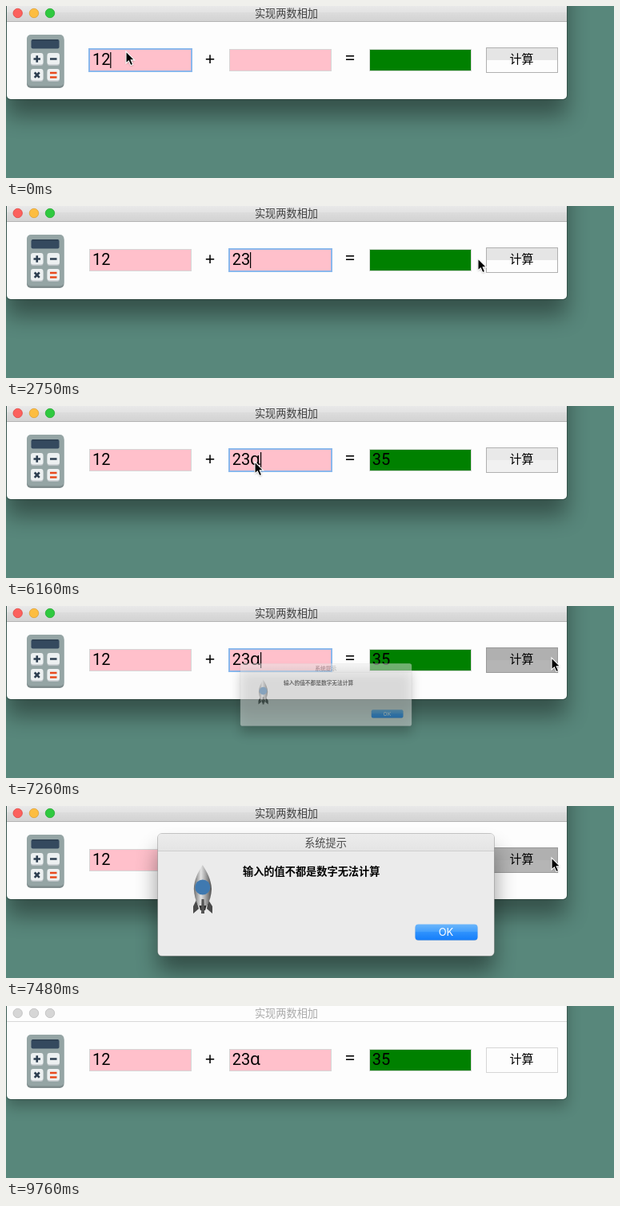
An HTML page for the animation above (9800 ms loop, 760x216 px).

```html
<!DOCTYPE html>
<html lang="zh">
<head>
<meta charset="utf-8">
<title>实现两数相加</title>
<style>
  html, body { margin: 0; width: 100%; height: 100%; overflow: hidden; background: #58877b; }
  svg { display: block; width: 760px; height: 216px; }
  text { font-family: "Noto Sans CJK SC", "Noto Sans CJK", sans-serif; font-size: 13.2px; }
  .mid { text-anchor: middle; }
  .num { font-family: Roboto, sans-serif; font-size: 20px; }
  .alpha { font-family: "Noto Sans", sans-serif; font-size: 21px; }
  .op { font-family: "Noto Sans", sans-serif; font-size: 22px; text-anchor: middle; }
  .ok { font-family: Inter, sans-serif; font-size: 13px; fill: #fff; text-anchor: middle; }
  .ring { fill: none; stroke: #8ab8ec; stroke-width: 2; }
  .sign { fill: none; stroke: #2c3e50; stroke-width: 2.6; }
</style>
</head>
<body>
<svg viewBox="0 0 760 216">
  <defs>
    <filter id="blur" x="-30%" y="-80%" width="160%" height="260%"><feGaussianBlur stdDeviation="14"/></filter>
    <filter id="soft" x="-30%" y="-80%" width="160%" height="260%"><feGaussianBlur stdDeviation="9"/></filter>
    <filter id="tiny" x="-50%" y="-50%" width="200%" height="200%"><feGaussianBlur stdDeviation="1"/></filter>
    <linearGradient id="bar" x2="0" y2="1">
      <stop offset="0" stop-color="#e9e9e9"/><stop offset=".4" stop-color="#e2e2e2"/>
      <stop offset=".42" stop-color="#dcdcdc"/><stop offset="1" stop-color="#d2d2d2"/>
    </linearGradient>
    <linearGradient id="dbar" x2="0" y2="1">
      <stop offset="0" stop-color="#ececec"/><stop offset="1" stop-color="#e4e4e4"/>
    </linearGradient>
    <linearGradient id="blue" x2="0" y2="1">
      <stop offset="0" stop-color="#6cb6fb"/><stop offset=".45" stop-color="#45a0fc"/>
      <stop offset=".5" stop-color="#2f92fd"/><stop offset="1" stop-color="#147dfa"/>
    </linearGradient>
    <linearGradient id="deep" x2="0" y2="1">
      <stop offset="0" stop-color="#4a98f8"/><stop offset="1" stop-color="#0a5fe2"/>
    </linearGradient>
    <linearGradient id="steel">
      <stop offset="0" stop-color="#6c6c6c"/><stop offset=".4" stop-color="#e2e2e2"/>
      <stop offset=".65" stop-color="#a8a8a8"/><stop offset="1" stop-color="#505050"/>
    </linearGradient>
  </defs>

  <rect width="760" height="216" fill="#58877b"/>

  <!-- main window -->
  <rect id="shade" x="1" y="-30" width="700" height="168" fill="#000" opacity=".4" filter="url(#blur)"/>
  <rect id="paleShade" x="1" y="-30" width="700" height="156" fill="#000" opacity=".28" filter="url(#soft)"/>
  <rect x=".5" y="-4.5" width="701" height="122" rx="5" fill="none" stroke="#000" stroke-opacity=".22"/>
  <rect x="1" y="-4" width="700" height="121" rx="5" fill="#fdfdfd"/>
  <g id="barOn">
    <path d="M1 0H700Q701 0 701 2V20H1Z" fill="url(#bar)"/>
    <path d="M1 19.5H701" stroke="#b4b4b4"/>
  </g>
  <path id="barOff" d="M1 19.5H701" stroke="#d9d9d9"/>
  <g id="lights" stroke-width=".8">
    <circle cx="14.7" cy="9" r="5.7" fill="#fc615d" stroke="#e0443f"/>
    <circle cx="35" cy="9" r="5.7" fill="#fdbd40" stroke="#dea034"/>
    <circle cx="55" cy="9" r="5.7" fill="#2fc93f" stroke="#25aa33"/>
  </g>
  <g id="greys" fill="#d6d6d6" stroke="#bdbdbd" stroke-width=".8">
    <circle cx="14.7" cy="9" r="5.7"/><circle cx="35" cy="9" r="5.7"/><circle cx="55" cy="9" r="5.7"/>
  </g>
  <text id="title" class="mid" x="350.5" y="14.3">实现两数相加</text>

  <!-- calculator -->
  <rect x="26" y="38" width="46.5" height="65" rx="5" fill="#7f8c8d"/>
  <rect x="26" y="36" width="46.5" height="64.500" rx="5" fill="#95a5a5"/>
  <rect x="31.500" y="42" width="35" height="11.500" rx="2" fill="#34495e"/>
  <path d="M33 42.800H65" stroke="#2c3e50" stroke-width="1.600"/>
  <g fill="#bdc3c7">
    <rect x="31" y="61" width="15.500" height="14" rx="3"/><rect x="51.500" y="61" width="15.500" height="14" rx="3"/>
    <rect x="31" y="81" width="15.500" height="14" rx="3"/><rect x="51.500" y="81" width="15.500" height="14" rx="3"/>
  </g>
  <g fill="#ecf0f1">
    <rect x="31" y="59" width="15.500" height="14.500" rx="3"/><rect x="51.500" y="59" width="15.500" height="14.500" rx="3"/>
    <rect x="31" y="79" width="15.500" height="14.500" rx="3"/><rect x="51.500" y="79" width="15.500" height="14.500" rx="3"/>
  </g>
  <path class="sign" d="M34.500 66.500H43M38.750 62.200V70.800M55 66.500H63.500M35.700 83.500L41.800 89.800M41.800 83.500L35.700 89.800"/>
  <path d="M55 84H63.500M55 89.500H63.500" stroke="#e8491d" stroke-width="2.500"/>

  <!-- fields -->
  <g stroke="#d6d6d6">
    <rect x="104.5" y="54.5" width="127" height="27" fill="#ffc0cb"/>
    <rect x="279.5" y="54.5" width="127" height="27" fill="#ffc0cb"/>
    <rect x="454.5" y="54.5" width="127" height="27" fill="#008000"/>
  </g>
  <rect id="ring1" class="ring" x="104" y="54" width="128" height="28"/>
  <rect id="ring2" class="ring" x="279" y="54" width="128" height="28"/>
  <text class="num" x="108" y="74">12</text>
  <text id="two" class="num" x="282.8" y="74">2</text>
  <text id="three" class="num" x="294" y="74">3</text>
  <text id="letter" class="alpha" x="305" y="74">ɑ</text>
  <text id="sum" class="num" x="457.800" y="74">35</text>
  <text class="op" x="255" y="73.500">+</text>
  <text class="op" x="430" y="73.300">=</text>
  <rect id="caret" y="58" width="1.200" height="20"/>

  <!-- button -->
  <rect id="face" x="600.5" y="52.5" width="89" height="31"/>
  <rect id="gloss" x="601" y="53" width="88" height="15"/>
  <text class="mid" x="644.5" y="72.300" style="font-size:15px">计算</text>

  <!-- dialog -->
  <g id="dialog">
    <rect id="dshade" x="190" y="55" width="420" height="153" rx="5" filter="url(#blur)"/>
    <g id="panel">
      <rect x="189.500" y="34.500" width="421" height="154" rx="5.500" fill="#ebebeb" stroke="#000" stroke-opacity=".2"/>
      <path d="M190 57V40Q190 35 195 35H605Q610 35 610 40V57Z" fill="url(#dbar)"/>
      <path d="M190 56.500H610" stroke="#cfcfcf"/>
      <text class="mid" x="399.500" y="51" fill="#4c4c4c">系统提示</text>
      <text x="296" y="86.500" font-weight="700">输入的值不都是数字无法计算</text>
      <g id="rocket">
        <path d="M238 118L234 126V135L241 129ZM253 118L258 126V135L251 129Z" fill="#4a4a4a"/>
        <path d="M241 124H251L249 131H243Z" fill="#333"/>
        <path d="M245.700 74C240 83 235 93 234.800 104Q235.500 116 240 125H251.500Q256.500 116 257 104C256.500 93 251.500 83 245.700 74Z" fill="url(#steel)"/>
        <path d="M244.500 117H247.500L248 135H244Z" fill="#555"/>
        <circle cx="245.800" cy="102" r="9.500" fill="#3f79b0"/>
      </g>
      <rect x="511.500" y="149" width="78" height="20" rx="4" fill="#000" opacity=".15"/>
      <rect id="okFace" x="511.500" y="148.500" width="78" height="20" rx="4"/>
      <text class="ok" x="550" y="163">OK</text>
    </g>
  </g>

  <g id="mouse">
    <path d="M0 1.500V16L3.500 13 6 18.500 8.800 17.300 6.500 12H11Z" opacity=".35" filter="url(#tiny)"/>
    <path d="M0 0V15L3.400 11.900 5.900 17.600 8.600 16.400 6.200 10.900H10.700Z" stroke="#fff" stroke-width="1.100"/>
  </g>
</svg>
<script>
const LOOP = 9800;
const el = Object.fromEntries([...document.querySelectorAll('[id]')].map(n => [n.id, n]));

// start, end, number of picture changes
const bursts = [[780, 1180, 8], [1950, 2930, 17], [4000, 4230, 5], [4460, 5320, 16],
  [6400, 6970, 10], [7200, 7480, 6], [7780, 8650, 15], [8950, 9120, 4]];

// time, x, y of the pointer
const route = [[740, 150, 57], [1180, 223, 55], [2200, 223, 55], [2750, 590, 66], [2930, 634, 66],
  [3950, 634, 66], [4230, 620, 75], [4460, 620, 75], [5020, 206, 77], [5320, 311, 70],
  [6350, 311, 70], [6920, 682, 65], [7780, 682, 65], [8400, 557, 161],
  [8900, 557, 161], [9120, 550, 217]];

// time, scale, opacity of the dialog
const zoom = [[7200, .3, .2], [7260, .524, .5], [7315, .72, .76], [7370, .87, .92], [7480, 1, 1]];

// caret is hidden in these spans
const blinks = [[1160, 1420], [2870, 3160], [3760, 4000], [4600, 4900], [5500, 5860], [6760, 6970]];

const within = (t, a, b) => t >= a && t < b;
const show = (id, on) => { el[id].style.display = on ? '' : 'none'; };

function snap(t) {
  const b = bursts.find(([a, z]) => within(t, a, z));
  if (!b) return t;
  const step = (b[1] - b[0]) / (b[2] - 1);
  return b[0] + Math.floor((t - b[0]) / step + .08) * step;
}

function sample(keys, t, ease) {
  if (t <= keys[0][0]) return keys[0].slice(1);
  const i = keys.findIndex(k => k[0] > t);
  if (i < 0) return keys[keys.length - 1].slice(1);
  const [a, b] = [keys[i - 1], keys[i]];
  const u = (t - a[0]) / (b[0] - a[0]);
  const p = ease ? u * u * (3 - 2 * u) : u;
  return a.slice(1).map((v, n) => v + (b[n + 1] - v) * p);
}

function paintButton(t) {
  const [face, gloss, edge] =
    within(t, 2980, 3220) || within(t, 6970, 8650) ? ['#b5b5b5', '#b0b0b0', '#999'] :
    within(t, 3220, 6970) ? ['#f1f1f1', '#e9e9e9', '#b0b0b0'] :
    t >= 9760 ? ['#fdfdfd', '#fdfdfd', '#d6d6d6'] : ['#fdfdfd', '#e5e5e5', '#b0b0b0'];
  el.face.setAttribute('fill', face);
  el.face.setAttribute('stroke', edge);
  el.gloss.setAttribute('fill', gloss);
}

function draw(t) {
  const idle = t >= 9760;
  const grey = idle || within(t, 7780, 8650);
  show('shade', !idle);
  show('paleShade', idle);
  show('barOn', !idle);
  show('barOff', idle);
  show('lights', !grey);
  show('greys', grey);
  el.title.setAttribute('fill', idle ? '#aaa' : '#404040');

  show('ring1', t < 540);
  show('ring2', within(t, 540, 8650));
  show('two', t >= 1590);
  show('three', t >= 2220);
  show('letter', t >= 6160);
  show('sum', t >= 3100);
  show('caret', t < 8650 && !blinks.some(([a, b]) => within(t, a, b)));
  el.caret.setAttribute('x', t < 540 ? 130.2 : t < 1590 ? 282 : t < 2220 ? 294 : t < 6160 ? 305 : 318);
  paintButton(t);

  const s = snap(t);
  const open = within(t, 7200, 8650);
  show('dialog', open);
  if (open) {
    const [k, alpha] = sample(zoom, s);
    el.dialog.setAttribute('transform', `translate(400 111.5) scale(${k}) translate(-400 -111.5)`);
    el.dshade.setAttribute('opacity', .42 * alpha);
    el.panel.setAttribute('opacity', alpha);
    el.okFace.setAttribute('fill', t >= 8460 ? 'url(#deep)' : 'url(#blue)');
  }

  const [x, y] = sample(route, s, true);
  show('mouse', t < 9120);
  el.mouse.setAttribute('transform', `translate(${x} ${y})`);
}

const start = performance.now();
function tick() {
  draw((performance.now() - start) % LOOP);
  requestAnimationFrame(tick);
}
tick();
</script>
</body>
</html>
```
